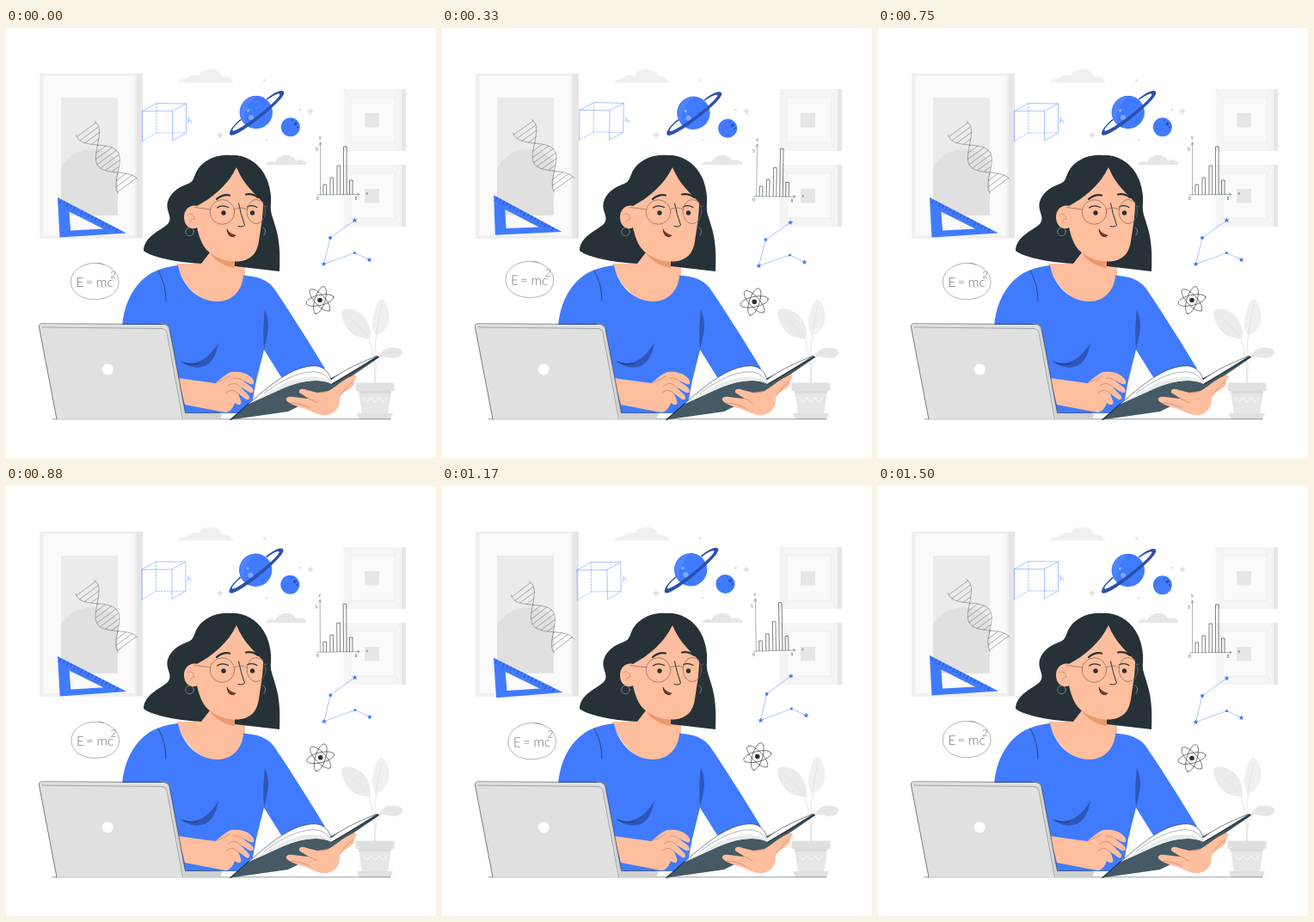
An HTML page that plays this animation: 500 by 500 pixels, repeating every 1540 ms.

```html
<!DOCTYPE html>
<html lang="en">
<head>
<meta charset="utf-8">
<title>Studying</title>
<style>
  html, body { margin: 0; width: 100%; height: 100%; overflow: hidden; background: #fff; }
  svg { display: block; width: 100vw; height: 100vh; }
  .line { fill: none; stroke-linecap: round; stroke-linejoin: round; }
  .ink { stroke: #263238; stroke-width: .6; }
  .thin { stroke: #455a64; stroke-width: .45; }
  .blue { stroke: #407bff; stroke-width: .45; }
  .crease { stroke: #b9775a; stroke-width: .6; }
  .skin { fill: #ffbe9d; }
  .shirt { fill: #407bff; }
  .fold { fill: #2e57b8; }
  .hair { fill: #263238; }
  .label { font: 5px Lato, sans-serif; fill: #455a64; }
  .formula { font: 300 15.5px Lato, sans-serif; fill: #66757d; }
  .power { font-size: 12px; }
</style>
</head>
<body>
<svg viewBox="0 0 500 500">
  <defs>
    <clipPath id="poster"><path d="M64 81h66v136.500h-66z"/></clipPath>
    <path id="spark" d="M0-4.500Q.8-.8 4.500 0 .8.8 0 4.500-.8.8-4.500 0-.8-.8 0-4.500Z"/>
    <path id="star" d="M0-3 .9-1 3-.9 1.400.5 1.900 2.600 0 1.500-1.900 2.600-1.400.5-3-.9-.9-1Z"/>
    <g id="frame">
      <path fill="#e6e6e6" d="M460 71h5v72h-5z"/>
      <path fill="#f5f5f5" d="M392.500 71h67.500v72h-67.500z"/>
      <path fill="#fafafa" d="M401 81h51v52h-51z"/>
      <path class="line" stroke="#e8e8e8" stroke-width=".6" d="M393 71l8 10h51l8-10M401 81v52h51V81M401 133l-8 10M452 133l8 10"/>
      <path fill="#e6e6e6" d="M417 99h17v16.500h-17z"/>
    </g>
  </defs>

  <!-- room -->
  <path fill="#e6e6e6" d="M39 53h120v191.500H39z"/>
  <path fill="#f0f0f0" d="M39 53h113v191.500H39z"/>
  <path fill="#fafafa" d="M43.500 56h106v185h-106z"/>
  <path fill="#ebebeb" d="M64 81h66v136.500h-66z"/>
  <circle cx="100" cy="182" r="41" fill="#e0e0e0" clip-path="url(#poster)"/>
  <path fill="#e0e0e0" d="M64 182h66v35.500h-66z"/>
  <use href="#frame"/>
  <use href="#frame" y="88"/>
  <path fill="#f0f0f0" d="M200 63.500c1-4 6-5 10-4 2-5 9-6 14-4 3-10 24-11 28 1 5-1 11 2 12 7z"/>
  <path fill="#e6e6e6" d="M302 159c1-4 7-5 11-3 4-10 20-11 24-2 5-2 12 0 13 5z"/>
  <g fill="#e0e0e0">
    <use href="#spark" x="249" y="124.500"/>
    <use href="#spark" x="354" y="97"/>
    <circle cx="300.500" cy="61" r="1.400"/>
    <circle cx="341.500" cy="95" r="1.500"/>
    <circle cx="303" cy="130.500" r="1.300"/>
  </g>

  <!-- plant -->
  <path fill="#ebebeb" d="M391 328c7-4 21 1 27 10 6 8 7 17 5 23-9 1-21-3-27-13-5-8-7-16-5-20z"/>
  <path fill="#f0f0f0" d="M436 315c7 3 11 16 9 26-2 9-9 16-15 16-5-6-5-17-2-27 2-8 5-13 8-15z"/>
  <path fill="#e6e6e6" d="M433 383c3-8 10-12 18-11 6 0 11 2 10 6-2 6-11 7-17 5-5-1-8-1-11 0z"/>
  <path class="line" stroke="#e0e0e0" stroke-width=".8" d="M399 337q16 12 23 24 7 22 7 52M437 322q-5 20-8 50v41M455 377q-19-2-24 14-2 9-2 22"/>
  <path fill="#e6e6e6" d="M410 422h38l-4 27h-30z"/>
  <path fill="#e0e0e0" d="M406.500 412.500h45v9.500h-45z"/>
  <path fill="#d9d9d9" d="M410 422h38l-.5 3h-37z"/>
  <path fill="#e0e0e0" d="M408 448h42l-3 7h-36z"/>
  <path class="line" stroke="#fff" stroke-width=".8" d="M415 430l5 5 4-5 5 5 5-5 4 5 5-5"/>

  <!-- floating science things -->
  <g id="float">
    <path class="shirt" fill-rule="evenodd" d="M60 197 62.500 243.500 140 238.500ZM73.500 213.500 113 233.500 75 235.500Z"/>
    <path id="ticks" class="line" stroke="#263f80" stroke-width=".7"/>

    <path id="dna" class="line thin"/>
    <path class="line blue" d="M158.500 96.500 175.500 87.500 209.500 88 193.500 96.500ZM158.500 96.500 158.500 131.500M193.500 96.500 193.500 130.500M209.500 88V122L193.500 131"/>
    <path class="line blue" stroke-dasharray="1.800 1.800" d="M175 88V122H209M175 122 158.500 131.500"/>
    <path class="line blue" d="M212.500 104v6M212.500 107.500q3-2 3 2.500"/>

    <circle cx="290.800" cy="98" r="19.200" class="shirt"/>
    <path fill="#5f92ff" d="M291 79a19 19 0 0 0-13 32q-5-14 13-32z" opacity=".45"/>
    <g fill="#82a9ff">
      <circle cx="285" cy="104" r="3"/>
      <circle cx="281.500" cy="96" r="1.800"/>
    </g>
    <g transform="translate(291 98) rotate(-38) scale(1 .86)">
      <path fill="#2b50ad" fill-rule="evenodd" d="M-19-6C-38-5-42 1-39 4-33 11 30 11 39 3 42-1 37-6 19-6L19-4C31-4 36-1 34 1 27 6-27 6-34 1-37-1-31-4-19-4Z"/>
    </g>
    <circle cx="330.800" cy="115.300" r="11" class="shirt"/>
    <g fill="#2b50ad">
      <circle cx="336.500" cy="111.500" r="2"/>
      <circle cx="339" cy="115.500" r="1.100"/>
      <circle cx="333" cy="107.500" r=".9"/>
    </g>

    <path class="line thin" d="M365.500 194V133l-1.500 3M365.500 133l1.500 3M362 194 411 193.500l-2.500-1.500M411 193.500l-2.500 1.500"/>
    <path id="bars" class="line ink"/>
    <g class="label">
      <text x="364" y="129">y</text>
      <text x="360" y="143">5</text>
      <text x="361" y="199.500">0</text>
      <text x="405.500" y="200">8</text>
      <text x="418.500" y="194">x</text>
    </g>

    <path class="line blue" d="M405.500 223.500 377 244 369.500 274.500 405.500 261.500 422.500 269.500"/>
    <g class="shirt">
      <use href="#star" x="405.500" y="223.500"/>
      <use href="#star" x="369.500" y="274.500"/>
      <use href="#star" x="422.500" y="269.500"/>
      <circle cx="377" cy="244" r="1.900"/>
      <circle cx="405.500" cy="261.500" r="1.500"/>
    </g>

    <g transform="translate(365 316.500)" class="line ink">
      <ellipse rx="16.500" ry="6" transform="rotate(-13)"/>
      <ellipse rx="16.500" ry="6" transform="rotate(47)"/>
      <ellipse rx="16.500" ry="6" transform="rotate(107)"/>
      <circle r="2.800" class="hair" stroke="none"/>
    </g>

    <path class="line thin" d="M113 274.500C94 270 75 280 75.500 295.500c0 12 13 21 29 20 16 0 27-9 26.500-21-.5-11-10-19-24-21"/>
    <g class="formula">
      <text x="81.500 92.500 105 117.500" y="301">E=mc</text>
      <text class="power" x="121" y="291">2</text>
    </g>
  </g>

  <path class="line" stroke="#455a64" stroke-width=".6" d="M54 454.800H447"/>

  <!-- body -->
  <path class="skin" d="M198 274H278V300Q262 322 242 319 212 314 198 274Z"/>
  <path class="shirt" d="M200 276C205 301 224 318 246 318 262 318 275 306 276 287.500 292 289 303 292 311 302 325 322 351 363 371 396L320 406 300 374 291 410 284 448H202L135 350C136 325 146 299 169 285 178 280 190 277 200 276Z"/>
  <path class="fold" d="M204 388Q229 396 247 366 243 390 228 394 215 397 204 388Z"/>
  <path class="fold" d="M301 327Q307 342 304 356 302 366 300 374 298 352 301 327Z"/>
  <path class="line" stroke="#263238" stroke-width=".7" d="M177 282Q186 298 186 317M204 388Q215 393 224 390"/>

  <!-- head -->
  <path class="hair" d="M268 148C262 148 255 147 246 149 237 151 227 157 222 166 218 173 219 178 212 181 204 184 192 189 188 202 185 213 195 220 188 228 179 236 160 243 160 259 172 268 205 273 228 274L250 262 266 277Q292 280 318 283C319 262 318 246 313 230 310 219 307 215 308 204 309 194 306 182 303 175 296 159 283 150 268 148Z"/>
  <path class="skin" d="M237 250V261L227 274 250 302 276 290 266 277V262Z"/>
  <path fill="#eb996e" d="M236.500 261Q249 270 266 271.500L266 279Q247 276 236.500 261Z"/>
  <path class="skin" d="M268 162C258 183 239 198 222 207 215 205 207 210 207 220 207 230 215 236 222 232 225 245 229 256 238 262 249 270 260 272 270 271.500 285 270 292 262 294 248 296 234 299 220 299 203 290 193 276 182 268 162Z"/>
  <path class="line crease" d="M211 217q5-4 8 4M214 226q1-4 5-4"/>
  <g class="line" stroke="#7b8b94" stroke-width=".9">
    <circle cx="213.500" cy="237" r="4.800"/>
    <path d="M299 232q5 3 1 9"/>
  </g>
  <g class="line" stroke="#263238">
    <path stroke-width="2.200" d="M245 199Q252 193 260 194.500M279 193.500Q287 192 293 197"/>
    <path stroke-width="1.200" d="M245.500 209Q251 205 258.500 208.500M280.500 208Q286 205 292 208.500"/>
    <path stroke-width="1" d="M270.500 204Q273 217 277.500 229 276 232 270 230.500"/>
  </g>
  <circle cx="253" cy="215" r="2.700" class="hair"/>
  <circle cx="286.500" cy="215" r="2.700" class="hair"/>
  <g class="line" stroke="#7f6b60" stroke-width=".7">
    <circle cx="251.500" cy="214" r="14.300"/>
    <ellipse cx="291" cy="213.500" rx="10.800" ry="14"/>
    <path d="M265.500 211Q273 207 280.500 211M237.500 211 219 208.500M301 208l3-1"/>
  </g>
  <path fill="#7a3b2c" d="M257 234Q261 239.500 268 241 263 244.500 259.500 241.500 257 239 257 234Z"/>
  <path class="line" stroke="#263238" stroke-width=".8" d="M257 234Q258 242 265 243"/>

  <!-- resting hand -->
  <path class="skin" d="M200 407 243 413C250 408 255 402 262 400 269 399 279 400 285 406 290 411 289 416 284 414L274 409 286 418C290 423 287 426 282 423L272 417 282 427C285 431 282 434 278 431L270 425 273 433C275 439 270 439 266 436 264 442 260 447 255 447L208 438Z"/>
  <path class="line crease" d="M243 413Q254 409 260 405M258 416Q266 410 272 417M256 424Q263 418 270 425M274 409Q270 406 265 407"/>

  <!-- laptop -->
  <path fill="#d0d0d0" d="M207 447.500H248Q252 448 251 451 250 454.500 246 454.800H207Z"/>
  <path fill="#d0d0d0" d="M180 343.800 185 344Q189 345 190 349L208.500 447.500V454.800H198Z"/>
  <path fill="#e0e0e0" d="M41 345H182Q187 345 188 350L207 454.800H59L38.500 348Q38 345 41 345Z"/>
  <path class="line ink" d="M59 454.800 38.500 348Q38 344 42 343.800L184 344.500Q189 345 190 349L208.500 447.500H248"/>
  <path class="line thin" d="M42 348 182 349.500Q186 350 187 354L205.500 454.800"/>
  <circle cx="118.300" cy="397" r="6.500" fill="#fff"/>

  <!-- book -->
  <path fill="#455a64" d="M261 455.500 290 432 318 409 378 407 432 381 434 383 380 420 328 446Z"/>
  <path fill="#fff" d="M282 437C304 418 334 391 361 393 370 394 376 401 378 409 392 398 412 389 431 381.500L379 414C364 406 340 411 322 419 308 425 294 432 282 437Z"/>
  <path fill="#ebebeb" d="M282 437 320 415C342 404 364 402 378 412L379 414C364 406 340 411 322 419Z"/>
  <path class="line ink" d="M282 437C304 418 334 391 361 393 370 394 376 401 378 409 392 398 412 389 431 381.500"/>
  <path class="line thin" d="M300 425C317 412 341 398 361 400 370 401 375 407 378 411"/>
  <path class="line" stroke="#263238" stroke-width="1.400" d="M261 455.500 282 437M379 414 433 382.500"/>

  <!-- holding hand -->
  <path class="skin" d="M326 433C325 429 329 428 334 429L342 430 352 431 341 424C340 419 345 419 350 421L362 424 375 422C384 417 394 407 404 404 409 402 409 406 404 411L405 414C401 420 394 422 389 427 387 434 389 440 382 446 373 454 361 449 351 444 342 441 330 438 326 433Z"/>
  <path class="line crease" d="M352 431Q357 433 361 436M331 436Q345 437 353 442M375 422Q369 425 362 424M389 427Q397 416 404 411"/>
</svg>
<script>
  const $ = id => document.getElementById(id);
  const range = n => [...Array(n).keys()];
  const draw = (id, d) => $(id).setAttribute('d', d);
  const seg = (x1, y1, x2, y2) => `M${x1} ${y1} ${x2} ${y2}`;

  draw('ticks', range(17).map(i => {
    const x = 64 + i * 4.1, y = 199.800 + i * 2.130, n = i % 2 ? 2.5 : 4;
    return seg(x, y, x - n * .45, y + n * .9);
  }).join(''));

  draw('bars', [[369, 182], [377, 174], [385, 160], [392.5, 138], [399.5, 177]]
    .map(([x, y]) => `M${x} 193.500V${y}h3.600V193.500`).join(''));

  // two sine strands about a slanted axis, s measured from the first crossing
  const lobe = 39.7;
  const strand = (s, side) => {
    const w = side * 14 * Math.sin(s / lobe * Math.PI);
    return [106.5 + .592 * s + .806 * w, 136 + .806 * s - .592 * w];
  };
  const curve = side => 'M' + range(43).map(i => strand(-24 + i * 2, side).map(v => v.toFixed(1)).join(' ')).join('L');
  const rungs = range(15).map(i => -22 + i * 5.7)
    .map(s => seg(...strand(s, 1), ...strand(s, -1))).join('');
  draw('dna', curve(1) + curve(-1) + rungs);

  // sways 1 degree each way in 1.5 s at 24 steps a second; the closing pose is held once more
  const LOOP = 1540, STEPS = 36;
  const sway = p => p < .25 ? 4 * p : p < .75 ? 2 - 4 * p : 4 * p - 4;
  const start = performance.now();
  function tick(now) {
    const t = Math.max(0, now - start) % LOOP;
    const step = Math.min(STEPS, Math.floor((t + 4.9) * .024));
    $('float').setAttribute('transform', `rotate(${sway(step / STEPS)} 242 203)`);
    requestAnimationFrame(tick);
  }
  tick(start);
</script>
</body>
</html>
```
